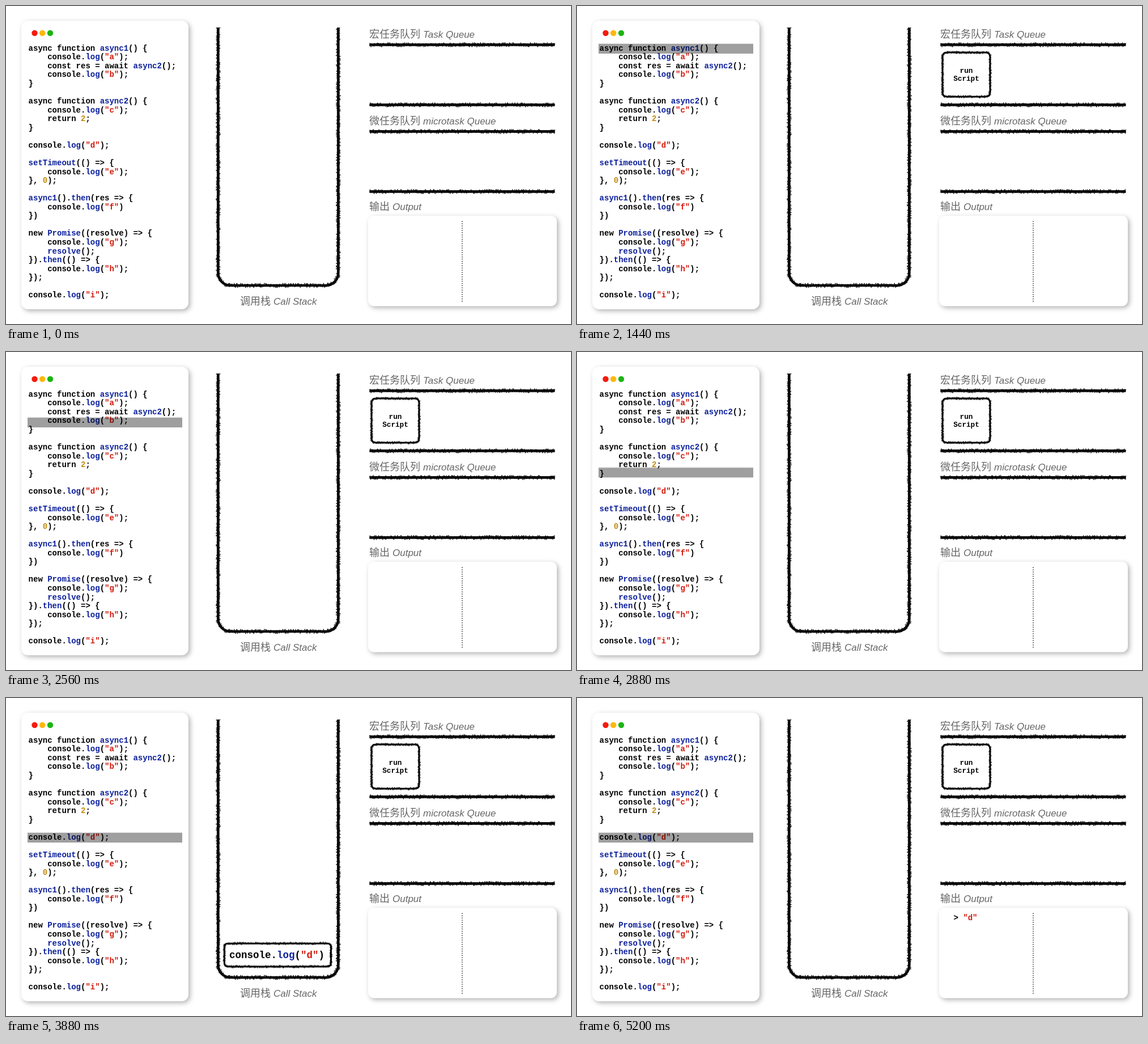
An HTML page for the animation above (5.68 s loop, 997 by 561 pixels).

```html
<!DOCTYPE html>
<html lang="zh-CN">
<head>
<meta charset="utf-8">
<title>Event loop</title>
<style>
  html, body { margin: 0; width: 100%; height: 100%; overflow: hidden; background: #fff; }
  svg { display: block; width: 997px; height: 561px; }

  .code { font: bold 14px "Liberation Mono", monospace; white-space: pre; fill: #000; }
  .code.small { font-size: 12.7px; text-anchor: middle; }
  .code.large { font-size: 17.5px; }
  .name { fill: #0b1f9a; }
  .string { fill: #d3190b; }
  .number { fill: #c18c12; }

  .label { font: 300 18px "Noto Sans CJK SC", "Noto Sans CJK", sans-serif; fill: #666; }
  .label .en { font: italic 17px "Liberation Sans", sans-serif; }

  .card { fill: #fff; filter: drop-shadow(3.5px 3.5px 4px rgba(0, 0, 0, .3)); }
  .rough { fill: none; stroke: #0a0a0a; stroke-linejoin: round; }

  #marker, #task, #frame, #result { animation: 5680ms linear infinite both; }
  #marker { fill: rgba(0, 0, 0, .375); animation-name: marker; }
  #task { animation-name: task; }
  #frame { animation-name: frame; }
  #result { animation-name: result; }

  @keyframes marker {
    0%, 9.33% { opacity: 0; transform: none; }
    16.73% { opacity: 1; transform: none; }
    39.26% { opacity: 1; transform: none; animation-timing-function: cubic-bezier(.364, 0, .636, 1); }
    55.46%, 100% { opacity: 1; transform: translateY(171px); }
  }
  @keyframes task {
    0%, 11.09% { transform: translateX(596px); animation-timing-function: cubic-bezier(.364, 0, .636, 1); }
    25.18%, 100% { transform: translateX(0); }
  }
  @keyframes frame {
    0%, 55.28% { transform: translateY(-754px); animation-timing-function: cubic-bezier(.364, 0, .636, 1); }
    69.37%, 82.85% { transform: translateY(0); animation-timing-function: cubic-bezier(.364, 0, .636, 1); }
    96.94%, 100% { transform: translateY(-754px); }
  }
  @keyframes result {
    0%, 71.13% { opacity: 0; }
    78.17%, 100% { opacity: 1; }
  }
</style>
</head>
<body>
<svg viewBox="0 0 997 561">
  <rect class="card" x="27" y="26" width="295" height="509" rx="12"/>
  <circle cx="50.5" cy="47.8" r="5.2" fill="#f31b0c"/>
  <circle cx="64.2" cy="47.8" r="5.2" fill="#fdb80a"/>
  <circle cx="78" cy="47.8" r="5.2" fill="#1cb513"/>
  <g id="listing"></g>
  <rect id="marker" x="38" y="66.6" width="273" height="17.4"/>

  <path class="rough" data-width="8.6" d="M374.3 38V471A22 22 0 0 0 396.3 493H564.3A22 22 0 0 0 586.3 471V38"/>
  <text class="label" x="413" y="526.5">调用栈<tspan class="en" x="472">Call Stack</tspan></text>

  <text class="label" x="641" y="56.3">宏任务队列<tspan class="en" x="736">Task Queue</tspan></text>
  <path class="rough" data-width="8.6" d="M641.5 68.3H968.5"/>
  <path class="rough" data-width="8.6" d="M641.5 174.3H968.5"/>
  <text class="label" x="641" y="209.3">微任务队列<tspan class="en" x="736">microtask Queue</tspan></text>
  <path class="rough" data-width="8.6" d="M641.5 221.3H968.5"/>
  <path class="rough" data-width="8.6" d="M641.5 327.3H968.5"/>

  <text class="label" x="641" y="359.8">输出<tspan class="en" x="682">Output</tspan></text>
  <rect class="card" x="639" y="370" width="333" height="159.5" rx="10"/>
  <path d="M805 379.5V522" stroke="#222" stroke-width="1.5" stroke-dasharray="1.5 2.4"/>
  <text id="result" class="code" x="664.5" y="391.7" data-code='> "d"'></text>

  <g id="task">
    <path class="rough" data-width="5.6" d="M653 82H721Q729 82 729 90V152Q729 160 721 160H653Q645 160 645 152V90Q645 82 653 82Z"/>
    <text class="code small" x="687" y="117.8">run</text>
    <text class="code small" x="687" y="132">Script</text>
  </g>

  <g id="frame">
    <path class="rough" data-width="5.6" d="M392 443.2H567Q573.5 443.2 573.5 450V477Q573.5 484 567 484H392Q385.3 484 385.3 477V450Q385.3 443.2 392 443.2Z"/>
    <text class="code large" x="394" y="468.5" data-code='console.log("d")'></text>
  </g>
</svg>

<script>
const SVG = 'http://www.w3.org/2000/svg';

function add(parent, tag, attrs, text = '') {
  const el = document.createElementNS(SVG, tag);
  for (const key in attrs) el.setAttribute(key, attrs[key]);
  el.textContent = text;
  parent.append(el);
  return el;
}

// Splits into strings, numbers, called names and everything else.
function highlight(el, source) {
  const token = /("[^"]*")|\b(\d)\b|(\w+)(?=\()/g;
  let end = 0;
  for (const m of source.matchAll(token)) {
    el.append(source.slice(end, m.index));
    add(el, 'tspan', { class: m[1] ? 'string' : m[2] ? 'number' : 'name' }, m[0]);
    end = m.index + m[0].length;
  }
  el.append(source.slice(end));
}

const program = `async function async1() {
    console.log("a");
    const res = await async2();
    console.log("b");
}

async function async2() {
    console.log("c");
    return 2;
}

console.log("d");

setTimeout(() => {
    console.log("e");
}, 0);

async1().then(res => {
    console.log("f")
})

new Promise((resolve) => {
    console.log("g");
    resolve();
}).then(() => {
    console.log("h");
});

console.log("i");`;

program.split('\n').forEach((line, i) => {
  const attrs = { class: 'code', x: 39.6, y: 78.7 + i * 15.56 };
  highlight(add(document.getElementById('listing'), 'text', attrs), line);
});
document.querySelectorAll('[data-code]').forEach(el => highlight(el, el.dataset.code));

let seed = 7;
function random() {
  seed = (seed * 16807) % 2147483647;
  return seed / 2147483647;
}

// Lays a jagged scribble across a solid core to look like chalk.
function roughen(path) {
  const width = +path.dataset.width;
  const length = path.getTotalLength();
  const points = [];
  for (let s = 0; s <= length; s += 0.75) {
    const a = path.getPointAtLength(Math.max(0, s - 0.5));
    const b = path.getPointAtLength(Math.min(length, s + 0.5));
    const span = Math.hypot(b.x - a.x, b.y - a.y) || 1;
    const off = (random() - 0.5) * width;
    const x = (a.x + b.x) / 2 - (b.y - a.y) / span * off;
    const y = (a.y + b.y) / 2 + (b.x - a.x) / span * off;
    points.push(x.toFixed(2) + ' ' + y.toFixed(2));
  }
  path.setAttribute('stroke-width', width * 0.55);
  const scribble = add(path.parentNode, 'path', {
    class: 'rough', 'stroke-width': 0.9, d: 'M' + points.join('L')
  });
  path.after(scribble);
}
document.querySelectorAll('[data-width]').forEach(roughen);
</script>
</body>
</html>
```
